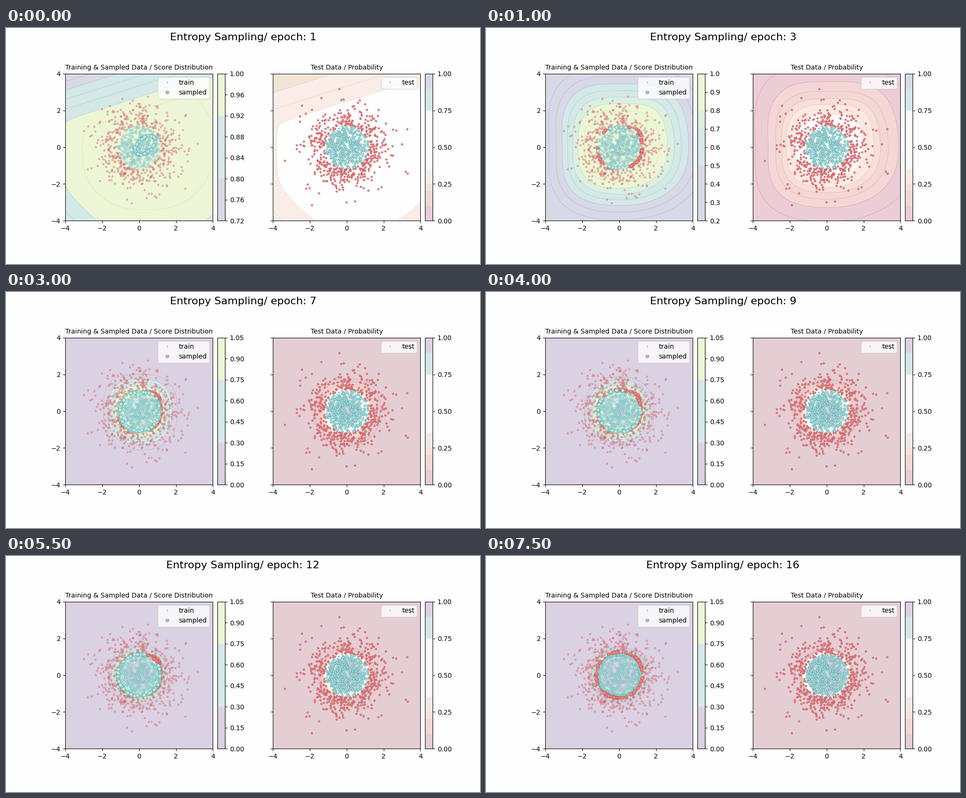
A matplotlib script that plays this animation: 1000x500 px, repeating every 8 s.

```python
import numpy as np
import matplotlib.pyplot as plt
from matplotlib.animation import FuncAnimation
from matplotlib.lines import Line2D

EPOCHS = 16
PAPER = "#fefefe"
RADIUS = np.sqrt(2 * np.log(2))      # median radius splits the two classes
Z_OUTER = -2.88                      # logit on the outer contour

fig = plt.figure(figsize=(10, 5), dpi=100, facecolor=PAPER)


def panel(x, width):
    return fig.add_axes([x / 1000, 91.8 / 500, width / 1000, 311.4 / 500])


ax_train, bar_train = panel(125, 311.4), panel(446.4, 15.6)
ax_test, bar_test = panel(563, 311.4), panel(884.4, 15.6)
heading = fig.suptitle("", fontsize=16)

# ---------------------------------------------------------------- data
train = np.random.RandomState(0).normal(size=(1000, 2))

# outlying test points, in pixels
FAR = [(846, 214), (835, 246), (843, 304), (847, 308), (588, 281), (703, 129),
       (645, 375), (718, 369), (736, 367), (624, 164), (665, 148), (707, 152),
       (712, 151), (746, 153), (620, 187), (620, 198), (632, 181), (645, 173),
       (823, 217), (816, 215), (613, 248), (621, 247), (613, 256), (619, 262),
       (633, 340), (640, 339), (660, 350), (697, 346), (754, 339), (764, 344),
       (785, 341), (792, 337), (808, 293), (802, 278), (816, 270), (812, 269),
       (815, 250), (806, 256), (801, 202), (786, 173), (784, 186), (757, 161),
       (742, 158), (636, 331)]
far = (np.array(FAR) - (718.7, 252.5)) / (38.92, -38.92)
test = np.random.RandomState(7).normal(size=(1000, 2))
test = np.vstack([test[np.hypot(*test.T) < 2.35], far])

# ---------------------------------------------------------------- model
# Per key epoch: outer contour (left, right, top, bottom, squareness, bulge),
# decision boundary (same six), logit at the centre, wobble.
KEYS = [3, 5, 7, 10, 13, 16]
SHAPES = np.array([
    [3.90, 4.60, 4.40, 3.90, 2.8, .03, 1.18, 1.23, 1.08, 1.12, 2.3, .14, 0.60, .020],
    [2.45, 2.70, 2.60, 2.43, 3.0, .06, 1.15, 1.20, 1.12, 1.12, 2.2, .12, 1.25, .015],
    [1.68, 1.77, 1.75, 1.80, 2.6, .02, 1.05, 1.08, 1.07, 1.07, 2.0, .13, 2.60, .010],
    [1.66, 1.62, 1.64, 1.58, 2.2, .02, 1.20, 1.15, 1.22, 1.15, 2.0, .13, 3.30, .005],
    [1.44, 1.45, 1.44, 1.42, 2.0, .02, 1.12, 1.10, 1.12, 1.10, 2.0, .05, 5.00, .003],
    [1.44, 1.48, 1.46, 1.42, 2.0, .01, 1.26, 1.24, 1.28, 1.22, 2.0, .06, 6.00, .003],
])

side = np.linspace(-4, 4, 101)
gx, gy = np.meshgrid(side, side)


def params(epoch):
    return np.array([np.interp(epoch, KEYS, col) for col in SHAPES.T])


def outline(angle, left, right, top, bottom, power, bulge):
    c, s = np.cos(angle), np.sin(angle)
    a = np.where(c < 0, left, right)
    b = np.where(s < 0, bottom, top)
    r = (np.abs(c / a) ** power + np.abs(s / b) ** power) ** (-1 / power)
    off = np.angle(np.exp(1j * (angle - np.pi / 4)))
    return r * (1 + bulge * np.exp(-(off / .35) ** 2))


def ring_logit(epoch):
    p = params(epoch)
    angle, r = np.arctan2(gy, gx), np.hypot(gx, gy)
    outer = outline(angle, *p[:6])
    outer *= 1 + p[13] * (np.sin(3 * angle + 1) + .6 * np.sin(5 * angle + 2))
    inner = outline(angle, *p[6:12])
    z = Z_OUTER * (r - inner) / (outer - inner)
    z = np.where(z < Z_OUTER, Z_OUTER + .8 * (z - Z_OUTER), z)
    return np.where(r < inner, p[12] * (1 - (r / inner) ** 2), z)


def first_logit():
    # direction, distance, logit there and slope of each flat side
    planes = [(-.3, .95, 2.59, -.685, .29), (-1, 0, 2.95, -.44, .20),
              (-.7, -.7, 4.50, -.685, .22), (0, -1, 3.40, -.45, .12)]
    parts = [.08 * (1 - np.hypot(gx - .3, gy - .1) / .55)]
    for dx, dy, dist, level, slope in planes:
        parts.append(level - slope * (dx * gx + dy * gy - dist))
    return -np.log(sum(np.exp(-20 * z) for z in parts)) / 20


def probability(epoch):
    if epoch == 1:
        z = first_logit()
    elif epoch == 2:
        z = (first_logit() + ring_logit(3)) / 2
    else:
        z = ring_logit(epoch)
    return 1 / (1 + np.exp(-z))


def entropy(p):
    return -(p * np.log2(p) + (1 - p) * np.log2(1 - p))


def sampled(epoch):
    rng = np.random.RandomState(100 + epoch)
    angle = rng.uniform(-np.pi, np.pi, 55)
    noise = rng.normal(0, .015, 55)
    if epoch == 1:
        u, v = (.64 + noise) * np.cos(angle), (.38 + noise) * np.sin(angle)
        tilt = np.radians(40)
        return np.column_stack([.32 + u * np.cos(tilt) - v * np.sin(tilt),
                                .12 + u * np.sin(tilt) + v * np.cos(tilt)])
    r = outline(angle, *params(epoch)[6:12]) + noise
    pts = np.column_stack([r * np.cos(angle), r * np.sin(angle)])
    return pts * .76 + (.15, .05) if epoch == 2 else pts


# ---------------------------------------------------------------- colours
TEAL, MINT, LIME = "#d4e8e7", "#daf0e1", "#ecf6d6"
LAV_LINE = "#b7b5d2"
LINES = {TEAL: "#a6d3d1", MINT: "#b4dcc4", LIME: "#d5e6b0"}
PINK_LINES = ["#cfa4b2", "#eab0a8", "#efc4ae", "#f1d3c6"]


def lavender(epoch):
    return "#d7d9e7" if epoch <= 3 else "#dad1e2"


def pinks(epoch):
    if epoch == 1:
        return ["#e7cdd7", "#eed9d4", "#f2e4d7", "#faede8"]
    if epoch <= 3:
        return ["#ebcdd5", "#f2d7d6", "#f6e0d9", "#fbeae3"]
    return ["#e4cdd3", "#f4d6d3", "#f8e2d8", "#f2e8e5"]


def score_levels(epoch):
    low, step, count = {1: (.72, .04, 7), 2: (.32, .08, 9),
                        3: (.2, .1, 8)}.get(epoch, (0, .15, 7))
    return low + step * np.arange(count + 1)


def score_bands(epoch, count):
    fills, lines = [], []
    for share in np.linspace(0, 1, count):
        if share < .31:
            fills.append(lavender(epoch))
            lines.append(LAV_LINE)
        else:
            fill = TEAL if share < .69 else MINT if share < .8 else LIME
            fills.append(fill)
            lines.append(LINES[fill])
    return fills, lines


def prob_bands(epoch):
    fills, lines = [], []
    for mid in np.arange(.025, 1, .05):
        if mid < .35:
            i = np.searchsorted([.1, .2, .25], mid)
            fills.append(pinks(epoch)[i])
            lines.append(PINK_LINES[i])
        elif mid < .75:
            fills.append(PAPER)
            lines.append(PAPER)
        else:
            fills.append(TEAL if mid < .9 else lavender(epoch))
            lines.append(LINES[TEAL] if mid < .9 else LAV_LINE)
    return fills, lines


# ---------------------------------------------------------------- drawing
def draw_field(ax, values, levels, fills, lines):
    values = np.clip(values, levels[0] + 1e-6, levels[-1] - 1e-6)
    ax.contourf(gx, gy, values, levels=levels, colors=fills, zorder=0)
    ax.contour(gx, gy, values, levels=levels[1:-1], colors=lines[:-1],
               linewidths=.6, zorder=1)


def draw_points(ax, pts, size, alpha, zorder):
    inside = np.hypot(*pts.T) < RADIUS
    for mask, face, edge in ((~inside, "#f08080", "#b8525a"),
                             (inside, "#afeeee", "#5f9ea0")):
        ax.scatter(*pts[mask].T, s=size, c=face, edgecolors=edge,
                   linewidths=.5, alpha=alpha, zorder=zorder)


def draw_bar(ax, levels, fills, ticks, fmt):
    ax.clear()
    for low, high, fill in zip(levels[:-1], levels[1:], fills):
        ax.axhspan(low, high, color=fill, lw=0, zorder=0)
    ax.set(xlim=(0, 1), ylim=(levels[0], levels[-1]), xticks=[])
    ax.yaxis.tick_right()
    ax.set_yticks(ticks, [fmt % t for t in ticks])


def dress(ax, title, entries):
    ax.set(xlim=(-4, 4), ylim=(-4, 4), facecolor=PAPER)
    ax.set_xticks(range(-4, 5, 2))
    ax.set_yticks(range(-4, 5, 2))
    ax.set_title(title, fontsize=10)
    handles = [Line2D([], [], ls="", marker="o", ms=size, mew=0,
                      color="#b4b4b4", label=name) for name, size in entries]
    ax.legend(handles=handles, loc="upper right").set_zorder(10)


def draw(step):
    epoch = step + 1
    heading.set_text(f"Entropy Sampling/ epoch: {epoch}")
    p = probability(epoch)

    ax_train.clear()
    levels = score_levels(epoch)
    fills, lines = score_bands(epoch, len(levels) - 1)
    draw_field(ax_train, entropy(p), levels, fills, lines)
    known = np.vstack([train] + [sampled(e) for e in range(1, epoch)])
    draw_points(ax_train, known, 7, .5, 3)
    draw_points(ax_train, sampled(epoch), 27, 1, 4)
    dress(ax_train, "Training & Sampled Data / Score Distribution",
          [("train", 2.2), ("sampled", 6)])
    draw_bar(bar_train, levels, fills, levels, "%.1f" if epoch == 3 else "%.2f")

    ax_test.clear()
    levels = np.linspace(0, 1, 21)
    fills, lines = prob_bands(epoch)
    draw_field(ax_test, p, levels, fills, lines)
    draw_points(ax_test, test, 7, 1, 3)
    dress(ax_test, "Test Data / Probability", [("test", 2.2)])
    ax_test.tick_params(labelleft=False)
    draw_bar(bar_test, levels, fills, np.linspace(0, 1, 5), "%.2f")
    return []


anim = FuncAnimation(fig, draw, frames=EPOCHS, init_func=lambda: [],
                     interval=500, repeat=True, repeat_delay=0)
plt.show()
```
